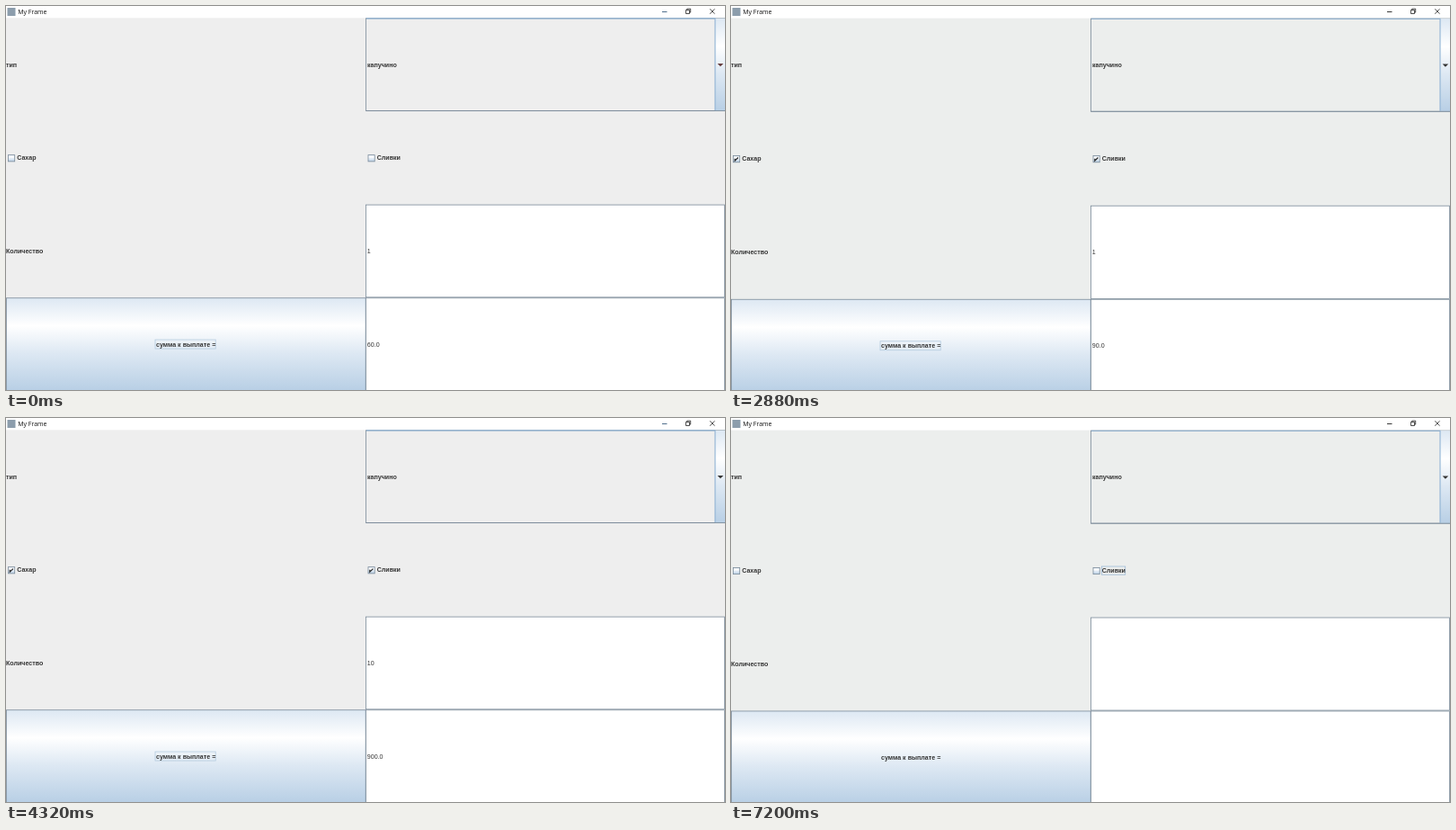
Recreate the animation shown at these times as an HTML page. Size 800 by 427 pixels, loop 8.64 s.

```html
<!DOCTYPE html>
<html lang="ru">
<head>
<meta charset="utf-8">
<title>My Frame</title>
<style>
html, body { margin: 0; width: 100%; height: 100%; overflow: hidden; background: #fff; }
svg { display: block; width: 800px; height: 427px; }
text { font: 7.1px "Liberation Sans", Arial, sans-serif; fill: #333; white-space: pre; }
.b { font-weight: bold; }
.title { font: 7px "Open Sans", sans-serif; fill: #111; }
</style>
</head>
<body>
<svg id="stage" viewBox="0 0 800 427">
  <defs>
    <linearGradient id="metal" x1="0" y1="0" x2="0" y2="1">
      <stop offset="0" stop-color="#dde8f3"/>
      <stop offset=".3" stop-color="#fff"/>
      <stop offset=".6" stop-color="#dde8f3"/>
      <stop offset="1" stop-color="#b8cfe5"/>
    </linearGradient>
  </defs>
  <g id="view"></g>
</svg>
<script>
const view = document.getElementById('view');
const STEP = 1440;
const EDGE = '#7a8a99', FOCUS = '#8fb2d4';

const base = { top: 13.3, pitch: 103.65, bg: '#eeeeee', kind: 'капучино', sugar: true, cream: true,
  count: '1', sum: '', focus: 'sum', combo: FOCUS, arrow: '#333', min: '#222' };
const tall = { top: 13.6, pitch: 104.05, bg: '#eceeed' };
const states = [
  { sugar: false, cream: false, sum: '60.0', arrow: '#643c3c', min: '#3d5f80' },
  { cream: false, sum: '65.0', arrow: '#643c3c', min: '#3d5f80' },
  { ...tall, sum: '90.0' },
  { count: '10', sum: '900.0', min: '#3d5f80' },
  { top: 12.8, pitch: 103.3, kind: 'эспрессо', sum: '70.0', combo: EDGE, taskbar: true },
  { ...tall, pitch: 103.95, sugar: false, cream: false, count: '', focus: 'cream' }
].map(s => ({ ...base, ...s }));

const rect = (x, y, w, h, fill, stroke = 'none', sw = .8) =>
  `<rect x="${x}" y="${y}" width="${w}" height="${h}" fill="${fill}" stroke="${stroke}" stroke-width="${sw}"/>`;
const path = (d, stroke, sw = .8, fill = 'none') =>
  `<path d="${d}" fill="${fill}" stroke="${stroke}" stroke-width="${sw}"/>`;
const text = (x, y, s, cls = 'b') => `<text x="${x}" y="${y}" class="${cls}">${s}</text>`;

function titleBar(s) {
  return rect(0, 0, 800, s.top, '#fff')
    + rect(1.5, 2, 9, 9, '#8c9dac')
    + text(13.2, 9.4, 'My Frame', 'title')
    + path('M730 6.5h5.5', s.min, .9)
    + path('M756.5 4.5h4v4h-4zM757.7 4.3v-1.2h4v4h-1.2', '#222')
    + path('M783.2 3.3l5.4 5.4m0-5.4l-5.4 5.4', '#222');
}

function comboBox(s, y, mid) {
  const b = y + s.pitch - .4;
  return rect(400.5, y + .5, 399.5, s.pitch - .9, s.bg, EDGE)
    + rect(789, y + .5, 11, s.pitch - .9, 'url(#metal)')
    + path(`M401 ${y + .6}H789V${b - .4}`, s.combo, 1.1)
    + path(`M400.5 ${b}H800`, EDGE)
    + path(`M791.6 ${mid - 1.1}h6.6l-3.3 3.3z`, 'none', 0, s.arrow)
    + text(402, mid + 2.5, s.kind);
}

function checkBox(x, mid, label, on, focused) {
  const y = mid - 3.1;
  return rect(x + 2.5, y, 7.2, 7.2, 'url(#metal)', EDGE)
    + (on ? path(`M${x + 4.3} ${y + 3.1}v2.4l3.6-3.6`, '#222', 1.2) : '')
    + (focused ? rect(x + 12, mid - 4.5, 26.2, 9.2, 'none', '#9dbad6') : '')
    + text(x + 12.2, mid + 2.7, label);
}

function field(y, h, mid, value) {
  return rect(400.5, y + .5, 399, h - .9, '#fff', EDGE)
    + text(401.8, mid + 2.6, value, '');
}

function sumButton(s, y, mid) {
  return rect(.4, y + .5, 399.8, s.pitch - .9, 'url(#metal)', EDGE)
    + (s.focus === 'sum' ? rect(166, mid - 5, 67.2, 10, 'none', '#b3cade') : '')
    + text(167, mid + 2.6, 'сумма к выплате =');
}

function draw(s) {
  const row = i => s.top + i * s.pitch;
  const mid = i => row(i) + s.pitch / 2;
  view.innerHTML = rect(0, 0, 800, 427, s.bg)
    + titleBar(s)
    + text(0, mid(0) + 2.8, 'тип')
    + comboBox(s, row(0), mid(0))
    + checkBox(0, mid(1), 'Сахар', s.sugar)
    + checkBox(400.5, mid(1), 'Сливки', s.cream, s.focus === 'cream')
    + text(0, mid(2) + 2.6, 'Количество')
    + field(row(2), s.pitch, mid(2), s.count)
    + sumButton(s, row(3), mid(3))
    + field(row(3), s.pitch, mid(3), s.sum)
    + (s.taskbar ? rect(0, 426, 800, 1, '#5d6670') + rect(430, 426, 30, 1, '#a5acb3') : '');
}

let shown = -1;
function tick() {
  const i = Math.floor(performance.now() / STEP) % states.length;
  if (i !== shown) draw(states[shown = i]);
  requestAnimationFrame(tick);
}
tick();
</script>
</body>
</html>
```
